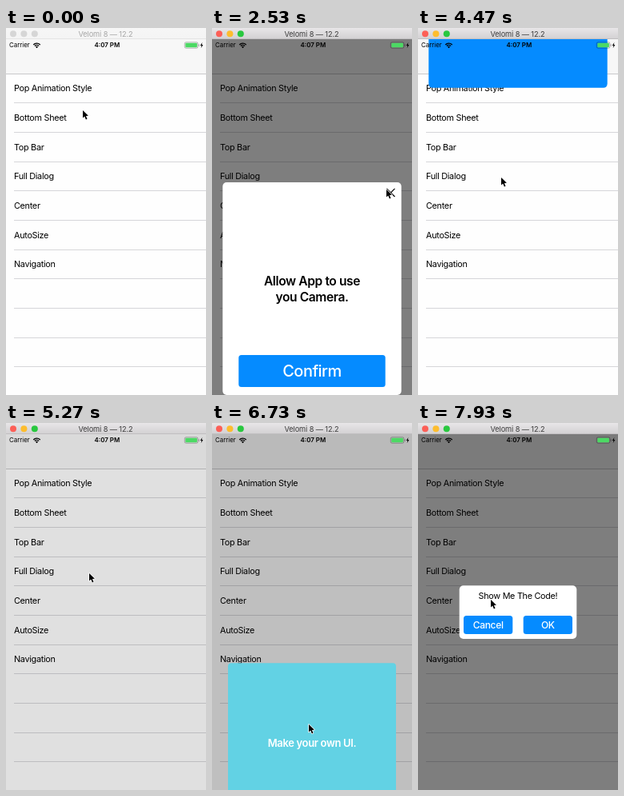
Write an HTML page with a canvas that moves like this. It is 250x459 px and loops after 8000 ms.

```html
<!DOCTYPE html>
<html lang="en">
<head>
<meta charset="utf-8">
<title>Popup demo</title>
<style>
  html, body { margin: 0; width: 100%; height: 100%; overflow: hidden; background: #fefefe; }
  canvas { display: block; width: 100vw; height: 100vh; }
</style>
</head>
<body>
<canvas id="stage"></canvas>
<script>
const W = 250, H = 459, LOOP = 8000, STEP = 1000 / 15;
const TOP = 14;            // bottom edge of the window title bar
const BLUE = '#058bff';
const ROWS = ['Pop Animation Style', 'Bottom Sheet', 'Top Bar', 'Full Dialog',
              'Center', 'AutoSize', 'Navigation'];
// Pointer stops: time, x, y
const POINTER = [
  [0, 96, 103], [130, 89, 107], [330, 95, 108], [1750, 95, 108], [2400, 218, 202],
  [2640, 218, 202], [3270, 101, 152], [3560, 101, 152], [4200, 104, 187],
  [4800, 104, 187], [5130, 104, 188], [5650, 104, 188], [6400, 121, 377],
  [6740, 121, 377], [7470, 90, 225], [7530, 91, 221], [LOOP, 91, 221]
];

const canvas = document.getElementById('stage');
const ctx = canvas.getContext('2d');

const clamp = v => Math.max(0, Math.min(1, v));
const mix = (a, b, p) => a + (b - a) * p;
const ease = v => { const p = clamp(v); return p * p * (3 - 2 * p); };
const ramp = (t, start, length) => ease((t - start) / length);

// Damped spring from 0 to 1 with a slight overshoot
function spring(ms) {
  if (ms <= 0) return 0;
  const damping = 0.8, omega = 26, s = ms / 1000;
  const root = Math.sqrt(1 - damping * damping), a = omega * root * s;
  return 1 - Math.exp(-damping * omega * s) * (Math.cos(a) + damping / root * Math.sin(a));
}

function rect(x, y, w, h, fill) {
  ctx.fillStyle = fill;
  ctx.fillRect(x, y, w, h);
}

function box(x, y, w, h, r, fill) {
  ctx.beginPath();
  ctx.roundRect(x, y, w, h, r);
  ctx.fillStyle = fill;
  ctx.fill();
}

function disc(x, y, r, fill) {
  ctx.beginPath();
  ctx.arc(x, y, r, 0, Math.PI * 2);
  ctx.fillStyle = fill;
  ctx.fill();
}

function shape(points) {
  ctx.beginPath();
  points.forEach(([x, y]) => ctx.lineTo(x, y));
  ctx.closePath();
}

function text(str, x, y, size, { weight = 400, color = '#000', align = 'left', track = -0.026 } = {}) {
  ctx.font = `${weight} ${size}px Inter, Roboto, sans-serif`;
  ctx.letterSpacing = size * track + 'px';
  ctx.textAlign = align;
  ctx.fillStyle = color;
  ctx.fillText(str, x, y);
}

function drawTitleBar(active) {
  const fill = ctx.createLinearGradient(0, 0, 0, TOP);
  fill.addColorStop(0, active ? '#e8e6e8' : '#f6f6f6');
  fill.addColorStop(1, active ? '#d2d0d2' : '#f4f4f4');
  rect(0, 0, W, TOP, fill);
  rect(0, TOP - 0.6, W, 0.6, active ? '#b4b2b4' : '#dadada');
  const lights = active ? ['#fc5f57', '#fdbd2e', '#29c83f'] : ['#d6d6d6', '#d6d6d6', '#d6d6d6'];
  lights.forEach((c, i) => disc(9 + i * 13.4, 7.2, 4, c));
  text('Velomi 8 — 12.2', 124.5, 10.7, 9.2,
       { color: active ? '#3c3c3c' : '#a6a6a6', align: 'center', track: -0.01 });
}

function drawList() {
  rect(0, TOP, W, H - TOP, '#fefefe');
  rect(0, TOP, W, 43, '#f7f7f7');
  rect(0, 57, W, 1, '#c8c8ca');
  const pitch = 110 / 3;
  for (let i = 1; i <= 10; i++) rect(10, Math.floor(57.01 + pitch * i), W - 10, 1, '#d6d6d9');
  ROWS.forEach((row, i) => text(row, 10, 79.2 + pitch * i, 10.8));
}

function drawStatus() {
  text('Carrier', 4, 24.3, 7.9, { track: 0 });
  text('4:07 PM', 126.3, 24.3, 7.9, { weight: 600, align: 'center', track: 0 });

  ctx.strokeStyle = '#000';
  ctx.lineWidth = 1.3;
  for (const r of [3.6, 5.8]) {
    ctx.beginPath();
    ctx.arc(38.5, 25, r, -Math.PI * 0.76, -Math.PI * 0.24);
    ctx.stroke();
  }
  ctx.beginPath();
  ctx.moveTo(38.5, 25.2);
  ctx.arc(38.5, 25, 2.2, -Math.PI * 0.76, -Math.PI * 0.24);
  ctx.fillStyle = '#000';
  ctx.fill();

  ctx.beginPath();
  ctx.roundRect(223.3, 17.8, 16.6, 7.4, 1.8);
  ctx.strokeStyle = 'rgba(0,0,0,.4)';
  ctx.lineWidth = 0.7;
  ctx.stroke();
  box(224.3, 18.8, 14.6, 5.4, 1, '#4cd964');
  box(240.7, 20.2, 0.9, 2.6, 0.4, 'rgba(0,0,0,.4)');
  shape([[245.4, 18], [242.8, 22], [244.4, 22], [243.8, 25], [246.4, 20.9], [244.8, 20.9]]);
  ctx.fillStyle = '#000';
  ctx.fill();
}

function drawDim(amount) {
  if (amount > 0) rect(0, TOP, W, H - TOP, `rgba(0,0,0,${amount * 0.5})`);
}

function button(label, x, y, w, h, size, baseline) {
  box(x, y, w, h, 3.5, BLUE);
  text(label, x + w / 2, baseline, size, { weight: 500, color: '#fff', align: 'center' });
}

function drawSheet(y) {
  box(13.3, y, 223.4, 266, 5, '#fff');
  ctx.beginPath();
  ctx.moveTo(218.3, y + 7.8);
  ctx.lineTo(228.5, y + 18);
  ctx.moveTo(228.5, y + 7.8);
  ctx.lineTo(218.3, y + 18);
  ctx.strokeStyle = '#000';
  ctx.lineWidth = 1.2;
  ctx.stroke();
  const style = { weight: 600, align: 'center' };
  text('Allow App to use', 125, y + 129.4, 15.6, style);
  text('you Camera.', 125, y + 148.6, 15.6, style);
  button('Confirm', 33.3, y + 216, 183.4, 40, 20, y + 243.2);
}

function drawDialog(y) {
  box(20, y, 210, 200, 4, '#62d2e4');
  text('Make your own UI.', 125, y + 104.5, 13,
       { weight: 600, color: '#fff', align: 'center' });
}

function drawAlert(p) {
  ctx.save();
  ctx.globalAlpha = p;
  ctx.translate(125, 236.7);
  ctx.scale(mix(0.6, 1, p), mix(0.6, 1, p));
  ctx.translate(-125, -236.7);
  box(51.7, 203.3, 146.6, 66.7, 5, '#fff');
  text('Show Me The Code!', 125, 220.3, 10.8, { align: 'center' });
  button('Cancel', 57, 241, 61.3, 23, 12, 256.8);
  button('OK', 131.7, 241, 61.3, 23, 12, 256.8);
  ctx.restore();
}

function drawPointer(t) {
  const i = POINTER.findIndex(k => k[0] > t);
  const [t0, x0, y0] = POINTER[i - 1], [t1, x1, y1] = POINTER[i];
  const p = ramp(t, t0, t1 - t0);
  ctx.save();
  ctx.translate(mix(x0, x1, p), mix(y0, y1, p));
  shape([[0, 0], [0, 9.6], [2.2, 7.6], [3.9, 11.4], [5.5, 10.7], [3.9, 7], [6.9, 6.8]]);
  ctx.lineJoin = 'round';
  ctx.strokeStyle = '#fff';
  ctx.lineWidth = 1.5;
  ctx.stroke();
  ctx.fillStyle = '#000';
  ctx.fill();
  ctx.restore();
}

function drawPopups(t) {
  if (t > 1015 && t < 2790) {
    drawDim(ramp(t, 1015, 180) - ramp(t, 2540, 250));
    drawSheet(H - 266 * (spring(t - 1015) - ramp(t, 2540, 250)));
  }
  if (t > 3420 && t < 4670) {
    const shown = spring(t - 3420) - ramp(t, 4420, 250);
    box(13.3, TOP - 67 * (1 - shown), 223.4, 67, 5, BLUE);
  }
  if (t > 5204 && t < 6860) {
    const out = ramp(t, 6607, 250);
    drawDim(ramp(t, 5204, 200) - out);
    drawDialog(mix(H, 136.5, spring(t - 5275) - out));
  }
  if (t > 7735) {
    const p = ramp(t, 7735, 195);
    drawDim(p);
    drawAlert(p);
  }
}

function draw(t) {
  drawList();
  ctx.save();
  ctx.beginPath();
  ctx.rect(0, TOP, W, H - TOP);
  ctx.clip();
  drawPopups(t);
  drawStatus();
  ctx.restore();
  drawTitleBar(t > 1015);
  drawPointer(t);
}

function resize() {
  const dpr = window.devicePixelRatio || 1;
  canvas.width = Math.round(innerWidth * dpr);
  canvas.height = Math.round(innerHeight * dpr);
}

const begin = performance.now();
function tick() {
  const t = (performance.now() - begin) % LOOP;
  // The screen updates fifteen times a second
  const held = Math.min(Math.floor((t + 4) / STEP), 119) * STEP;
  ctx.setTransform(canvas.width / W, 0, 0, canvas.height / H, 0, 0);
  draw(held);
  requestAnimationFrame(tick);
}

addEventListener('resize', resize);
resize();
tick();
</script>
</body>
</html>
```
